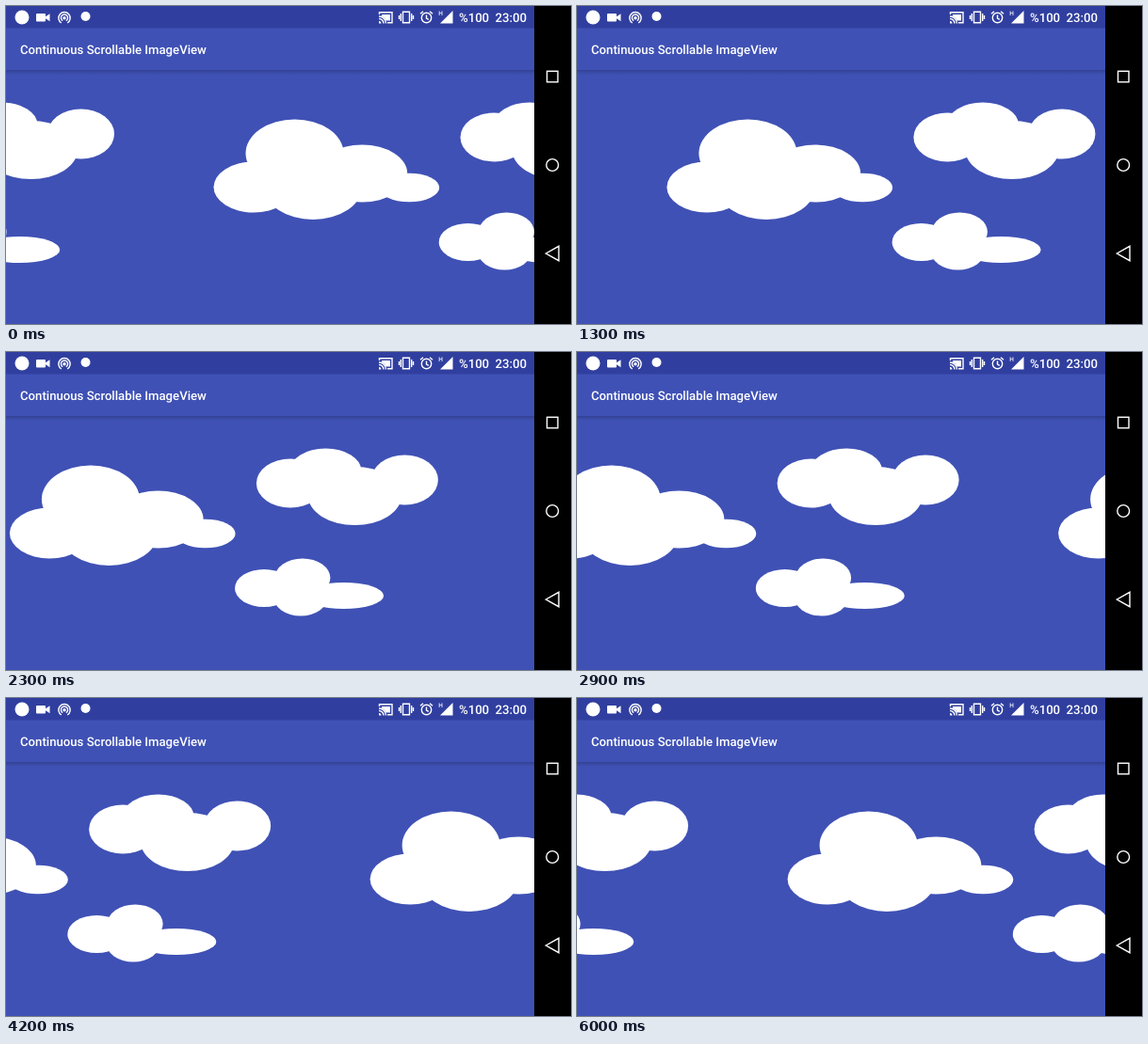
Write an HTML page that moves like this. It is 600 px wide and 338 px high and loops after 6100 ms.

```html
<!DOCTYPE html>
<html lang="en">
<head>
<meta charset="utf-8">
<title>Continuous Scrollable ImageView</title>
<style>
  html, body { margin: 0; width: 100%; height: 100%; overflow: hidden; background: #3f51b5; }
  svg { display: block; }
  text { font: 500 13.16px Roboto, sans-serif; fill: #fff; text-rendering: geometricPrecision; }
  .line { fill: none; stroke: #fff; stroke-width: 1.4; }
</style>
</head>
<body>
<svg width="600" height="338" viewBox="0 0 600 338">
  <defs>
    <linearGradient id="shade" x2="0" y2="1">
      <stop offset="0" stop-opacity=".2"/>
      <stop offset=".4" stop-opacity=".11"/>
      <stop offset="1" stop-opacity="0"/>
    </linearGradient>
    <g id="clouds" fill="#fff">
      <g id="big">
        <ellipse cx="306.5" cy="156.5" rx="52" ry="36"/>
        <ellipse cx="263" cy="192.5" rx="42.5" ry="27"/>
        <ellipse cx="326" cy="192" rx="52" ry="35"/>
        <ellipse cx="378.2" cy="178" rx="48" ry="30.5"/>
        <ellipse cx="428.2" cy="193" rx="32" ry="15.3"/>
      </g>
      <g id="high">
        <ellipse cx="518.5" cy="139.5" rx="36" ry="26"/>
        <ellipse cx="556" cy="126" rx="38" ry="23.5"/>
        <ellipse cx="587" cy="153" rx="49.5" ry="31"/>
        <ellipse cx="640" cy="136" rx="35.5" ry="26.5"/>
      </g>
      <g id="low">
        <ellipse cx="490.7" cy="251" rx="31" ry="20"/>
        <ellipse cx="531.5" cy="240" rx="29.5" ry="20.5"/>
        <ellipse cx="529.5" cy="260" rx="29" ry="20.5"/>
        <ellipse cx="575.2" cy="259" rx="42.5" ry="14"/>
      </g>
    </g>
  </defs>
  <rect width="600" height="338" fill="#3f51b5"/>
  <g id="sky"></g>

  <!-- app bar -->
  <rect y="22" width="561" height="46" fill="#3f51b5"/>
  <rect y="68" width="561" height="5" fill="url(#shade)"/>
  <text x="15" y="51">Continuous Scrollable ImageView</text>

  <!-- status bar -->
  <rect width="561" height="23.5" fill="#303f9f"/>
  <g fill="#fff">
    <circle cx="17" cy="12" r="7.5"/>
    <path d="M33 8h8q1 0 1 1v2.2l4.500-3v8l-4.500-3v2.200q0 1-1 1h-8q-1 0-1-1V9q0-1 1-1z"/>
    <circle cx="62" cy="12.8" r="1.7"/>
    <circle cx="84.5" cy="11" r="5"/>
    <path d="M396 16a2.5 2.5 0 0 1 2.5 2.5H396zM399 9h9v6.5h-4.5A7 7 0 0 0 399 11z"/>
    <path d="M474.5 5V18.5H461z"/>
  </g>
  <g class="line">
    <path d="M58.8 18a6.2 6.2 0 1 1 6.4 0M60.2 15.7a3.6 3.6 0 1 1 3.6 0"/>
    <path d="M396.5 9V6.7H410V17.7H405M396 13.5a5 5 0 0 1 5 5M396 11a7.5 7.5 0 0 1 7.5 7.5"/>
    <path d="M421.5 6.3h7v11.4h-7zM419.3 8v8M417.5 10v4M430.7 8v8M432.5 10v4"/>
    <circle cx="446.5" cy="12.5" r="5.2"/>
    <path d="M446.5 9.5v3.5l2.3 1.4M440 8.3l3-2.6M453 8.3l-3-2.6"/>
  </g>
  <text x="459.2" y="10.2" style="font-size:6.5px">H</text>
  <text x="481" y="17">%100</text>
  <text x="519.5" y="17">23:00</text>

  <!-- navigation bar -->
  <rect x="561" width="39" height="338"/>
  <g class="line" stroke-width="1.5">
    <rect x="574.5" y="69.3" width="11.5" height="11.5"/>
    <circle cx="580.2" cy="169" r="6.4"/>
    <path d="M573.3 263L587 255.3V270.7z"/>
  </g>
</svg>
<script>
const PERIOD = 560.5, LOOP = 6100, STEP = 100;
const sky = document.getElementById("sky");
sky.innerHTML = [-1, 0, 1].map(i => `<use href="#clouds" x="${i * PERIOD}"/>`).join("");

// steady scroll that runs slightly ahead twice per loop
const scrolled = t => 0.0929 * t + 4.4 * Math.abs(Math.sin(Math.PI * t / 3000));

function draw(now) {
  const t = Math.floor(now % LOOP / STEP) * STEP;
  sky.setAttribute("transform", `translate(${-scrolled(t)})`);
  requestAnimationFrame(draw);
}
draw(0);
</script>
</body>
</html>
```
